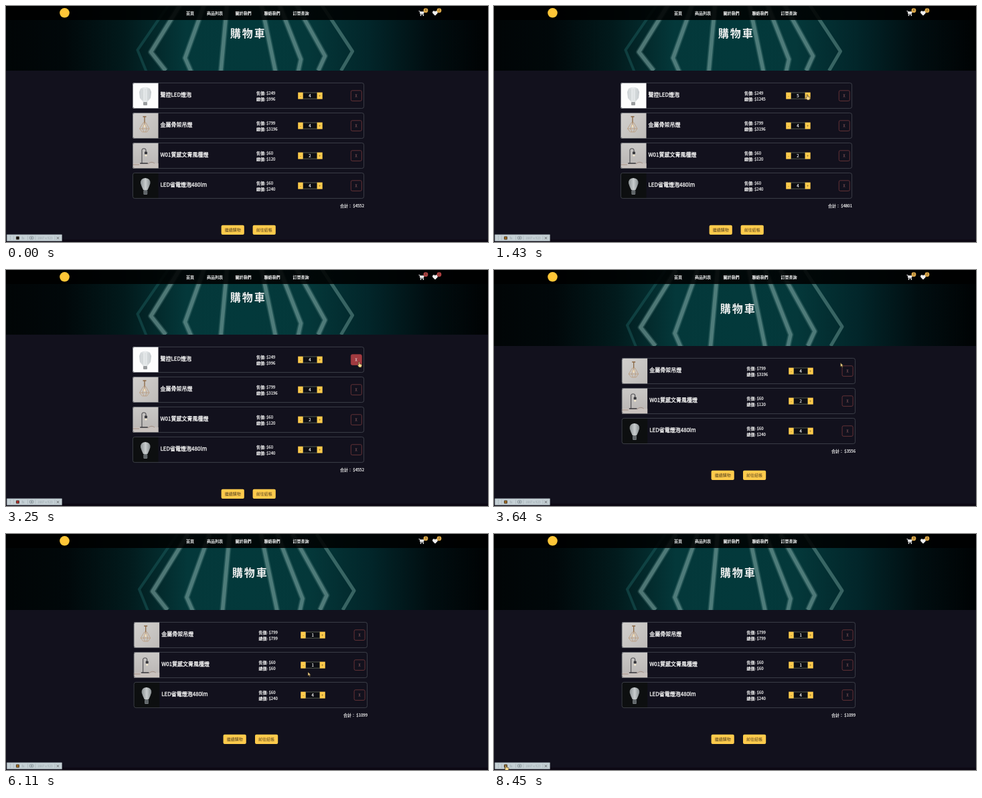
An HTML page with a canvas that plays this animation: 720x354 px, repeating every 8580 ms.

```html
<!DOCTYPE html>
<html lang="zh-Hant">
<meta charset="utf-8">
<title>購物車</title>
<style>
  html, body { margin: 0; width: 100%; height: 100%; overflow: hidden; background: #12111d; }
  canvas { display: block; }
</style>
<canvas width="720" height="354"></canvas>
<script>
const ctx = document.querySelector('canvas').getContext('2d');
const LOOP = 8580, STEP = 130, REMOVE_AT = 3510;
const YELLOW = '#ffcb4c', PAGE = '#12111d', WHITE = '#f0f0f0';
const FONT = '"Noto Sans CJK TC", "Noto Sans CJK JP", "Noto Sans CJK", "Noto Sans", sans-serif';

const products = [
  { name: '聲控LED燈泡', price: 249, count: 4, draw: whiteBulb },
  { name: '金屬骨架吊燈', price: 799, count: 4, draw: cageLamp },
  { name: 'W01質感文青風檯燈', price: 60, count: 2, draw: deskLamp },
  { name: 'LED省電燈泡480lm', price: 60, count: 4, draw: darkBulb },
];
// [time, product, change]
const clicks = [[1430, 0, 1], [1690, 0, 1], [2600, 0, -1], [2860, 0, -1],
  [4550, 1, -1], [4810, 1, -1], [5070, 1, -1], [5590, 2, -1]];
// [time, x, y]
const pointer = [[130, 18, 352], [1040, 467, 133], [1950, 467, 133], [2340, 440, 133], [2990, 440, 133],
  [3250, 526.5, 138], [3510, 526.5, 138], [4160, 441, 151], [5070, 441, 151], [5330, 443, 196],
  [5980, 443, 196], [6110, 451, 207], [7020, 180, 372], [7930, 60, 372], [8450, 17, 347], [8580, 17, 347]];

function rect(x, y, w, h, fill, radius = 0, stroke) {
  ctx.beginPath();
  ctx.roundRect(x, y, w, h, radius);
  if (fill) { ctx.fillStyle = fill; ctx.fill(); }
  if (stroke) { ctx.strokeStyle = stroke; ctx.lineWidth = .8; ctx.stroke(); }
}
function circle(x, y, r, fill) {
  ctx.beginPath();
  ctx.arc(x, y, r, 0, 7);
  ctx.fillStyle = fill;
  ctx.fill();
}
function shape(d, fill, stroke, width = 1) {
  const path = new Path2D(d);
  if (fill) { ctx.fillStyle = fill; ctx.fill(path); }
  if (stroke) { ctx.strokeStyle = stroke; ctx.lineWidth = width; ctx.stroke(path); }
}
// y is the middle of the line; medium weight is the regular face with a thin outline
function text(s, x, y, size = 6, { align = 'left', color = WHITE, weight = 400, medium = false, spacing = 0 } = {}) {
  ctx.font = `${weight} ${size}px ${FONT}`;
  ctx.letterSpacing = spacing + 'px';
  ctx.textAlign = align;
  ctx.fillStyle = ctx.strokeStyle = color;
  ctx.lineWidth = size * .04;
  ctx.fillText(s, x, y + size * .37);
  if (medium) ctx.strokeText(s, x, y + size * .37);
}
function gradient(x0, y0, x1, y1, ...colors) {
  const g = ctx.createLinearGradient(x0, y0, x1, y1);
  colors.forEach((c, i) => g.addColorStop(i / (colors.length - 1), c));
  return g;
}

function whiteBulb() {
  rect(0, 0, 39, 39, '#fdfdfd');
  shape('M12 9Q19 4 26 9L28 14L27 23Q23 28 22 29H16Q15 28 11 23L10 14Z', gradient(10, 0, 28, 0, '#c9ced1', '#eceff0', '#c1c7ca'));
  shape('M15 10V26M19 9V27M23 10V26', null, '#b9c0c3', .5);
  rect(16, 29, 6, 5, '#9a9d9f', 1);
}
function cageLamp() {
  rect(0, 0, 39, 39, gradient(0, 0, 39, 39, '#d2d0ce', '#bebbb8'));
  shape('M15.5 6H20.5M18 6V15', null, '#8a6642', 1.3);
  circle(18, 20, 2.3, '#eee0c4');
  shape('M16 15H20L25 24L21.5 29H14.5L10.5 24ZM18 15L15 24L17 29M18 15L21 24L19.5 29M10.5 24H25', null, '#b58d66', .6);
}
function deskLamp() {
  rect(0, 0, 39, 39, gradient(0, 0, 0, 39, '#cac8c6', '#b9b5b3'));
  rect(0, 31, 39, 8, '#c9c2be');
  shape('M14 31V11Q14 9 16 9H18Q20 9 20 11V14', null, '#303036', .9);
  rect(18, 13.5, 4, 4, '#36363b', 1);
  circle(20, 19, 1.6, '#f6ead0');
  rect(11, 30.3, 12, 1.5, '#36343a', .7);
  shape('M0 33H10M23 32Q28 27 33 31', null, '#9d8475', .8);
}
function darkBulb() {
  rect(0, 0, 39, 39, '#0d0f10');
  shape('M19 8Q27 8.5 26.5 16Q25 21 22.5 26H16Q13.5 21 12 16Q11.5 8.5 19 8Z', gradient(12, 0, 27, 0, '#8d9395', '#c9cdce', '#81888a'));
  rect(16.3, 26, 6, 7, '#6d7376', 1.5);
  shape('M17 28.5H22M17 30.5H22', null, '#414648', .6);
}

function hero(scrolled) {
  ctx.save();
  if (scrolled) ctx.translate(-2.5, -17);
  rect(0, 0, 730, 114, gradient(0, 0, 724, 0, '#010506', '#01080a', '#021a1c', '#04383a', '#03393b', '#04383a', '#02262a', '#010e11', '#000203'));
  ctx.lineJoin = 'round';
  shape('M256 0L199 83L214 120', null, '#1d5c5c80', 4);
  for (const d of ['M272 0L219 86L241 114', 'M304 0L270 95L281 120', 'M334 0L323 120',
    'M381 0L406 120', 'M405 0L443 97L438 120', 'M428 0L479 92L469 114']) {
    shape(d, null, '#6f9b9640', 9);
    shape(d, null, '#7fa5a180', 5.5);
  }
  shape('M464 0L520 85L503 114', null, '#6f9b9680', 5);
  ctx.restore();
}

function header(count, accent) {
  rect(0, 0, 720, 21, '#000000dd');
  circle(87.5, 10.3, 7.3, '#ffc637');
  [['首頁', 269], ['商品列表', 300], ['關於我們', 342.5], ['聯絡我們', 385.5], ['訂單查詢', 428.5]]
    .forEach(([label, x]) => text(label, x, 10.7, 6, { medium: true }));
  shape('M616.5 7.5H618L619 12.3H624', null, WHITE, .9);
  shape('M618 8.3H625L624 11.8H619Z', WHITE);
  circle(619.6, 14, .9, WHITE);
  circle(623.4, 14, .9, WHITE);
  shape('M641 14.5L637.5 11Q636.3 8.5 638.2 7.4Q640 6.8 641 8.5Q642 6.8 643.8 7.4Q645.7 8.5 644.5 11Z', WHITE);
  [[627, count], [647, 2]].forEach(([x, n]) => {
    circle(x, 6.7, 3.4, accent);
    text(n, x, 6.7, 4.5, { align: 'center', color: '#4a3c22' });
  });
}

function row(item, y, fx, hovered) {
  const left = fx(189), middle = y + 19.6, qx = fx(436), bx = fx(515);
  ctx.save();
  ctx.translate(left, y);
  ctx.beginPath();
  ctx.roundRect(0, 0, 38.5, 39, [3, 0, 0, 3]);
  ctx.clip();
  item.draw();
  ctx.restore();
  rect(left + .4, y + .4, fx(535) - left - .8, 38.2, null, 3, '#474b54');
  text(item.name, left + 41.5, y + 18.3, 8, { medium: true });
  text(`售價: $${item.price}`, fx(374), y + 15.5, 6, { medium: true });
  text(`總價: $${item.price * item.count}`, fx(374), y + 24.5, 6, { medium: true });

  rect(qx + 7.5, middle - 4.6, 21.5, 9.2, '#0c0d13', 0, '#66705f');
  rect(qx + .2, middle - 5, 7.3, 10, YELLOW);
  rect(qx + 28.7, middle - 5, 8, 10, YELLOW);
  const dark = { align: 'center', color: '#6b5526' };
  text('-', qx + 4, middle, 6, dark);
  text('+', qx + 32.7, middle, 6, dark);
  text(item.count, qx + 18, middle + .2, 6, { align: 'center', medium: true });

  rect(bx + .3, middle - 7.8, 16, 15.6, hovered ? '#a23b40' : null, 2, hovered ? '#a23b40' : '#793a3d');
  text('X', bx + 8.2, middle + .2, 5.5, { align: 'center', color: hovered ? WHITE : '#956062' });
}

function toolbar(stopColor) {
  rect(0, 350.5, 720, 4, '#0c0813');
  rect(1.4, 343, 82, 9.4, '#c5d0d5', 0, '#98a4aa');
  shape('M11.5 344.5V351M32.5 344.5V351M44 344.5V351M73 344.5V351', null, '#a5b0b5', .6);
  [345.5, 347.8, 350].forEach(y => circle(6.5, y, .5, '#8a979d'));
  rect(15.4, 346, 4, 4, stopColor, 0, '#33291a');
  const gray = { color: '#9aa6ac' };
  text('fx', 23.5, 347.8, 5, gray);
  rect(35.4, 345.8, 5.5, 4, null, 1, '#7d8a90');
  circle(38.2, 347.8, 1.1, '#7d8a90');
  text('1887 x 923', 47, 347.8, 4.7, gray);
  text('×', 77.5, 347.8, 6, { align: 'center', color: '#333' });
}

function cursor(t) {
  const i = pointer.findLastIndex(p => p[0] <= t);
  if (i < 0 || t <= pointer[0][0]) return;
  const [t0, x0, y0] = pointer[i], [t1, x1, y1] = pointer[i + 1];
  const p = (t - t0) / (t1 - t0), k = p * p * (3 - 2 * p);
  ctx.save();
  ctx.translate(x0 + (x1 - x0) * k, y0 + (y1 - y0) * k);
  const hand = x0 === x1 && y0 === y1;
  shape(hand
    ? 'M0 0Q1 -.8 1.6 .3V2.8L4.6 3.5Q5.4 4 5 5.6L4.2 8H1L-1.4 5Q-1.4 3.8 0 4.6Z'
    : 'M0 0V5.8L1.4 4.6L2.4 6.7L3.5 6.2L2.5 4.2H4.3Z', '#f7d88c', '#33291a', .6);
  ctx.restore();
}

function draw(t) {
  const full = t < REMOVE_AT;
  const hovered = full && t >= 3250;
  const fx = x => full ? x : x + 1.7 + (x - 189) * .0095;
  const all = products.map((p, i) => ({
    ...p, count: clicks.reduce((n, [at, who, change]) => n + (who === i && t >= at ? change : 0), p.count),
  }));
  const items = full ? all : all.slice(1);
  const top = full ? 0 : 17;
  const accent = hovered ? '#b04243' : '#dda94a';

  rect(0, 0, 720, 354, PAGE);
  hero(full);
  rect(0, 97 + top, 720, 257, PAGE);
  text('購物車', fx(334.7), 40.7 + top, 16, { weight: 700, spacing: 2 });
  header(items.length, accent);

  items.forEach((item, i) => row(item, 115 + top + i * 45, fx, hovered && i === 0));
  const end = 109 + top + items.length * 45;
  const total = items.reduce((sum, p) => sum + p.price * p.count, 0);
  text(`合計： $${total}`, fx(535), end + 11, 6, { align: 'right', medium: true });
  [['繼續購物', 321], ['前往結帳', 368]].forEach(([label, x]) => {
    rect(fx(x) + .6, end + 39.8, 34.2, 14.2, YELLOW, 2);
    text(label, fx(x) + 17.7, end + 47, 6, { align: 'center', color: '#54431f' });
  });

  toolbar(t < 1040 ? '#111' : hovered ? '#b52b2b' : '#a86f22');
  cursor(t);
}

function frame() {
  const t = performance.now() % LOOP;
  draw(Math.floor(t / STEP) * STEP);
  requestAnimationFrame(frame);
}
frame();
</script>
</html>
```
